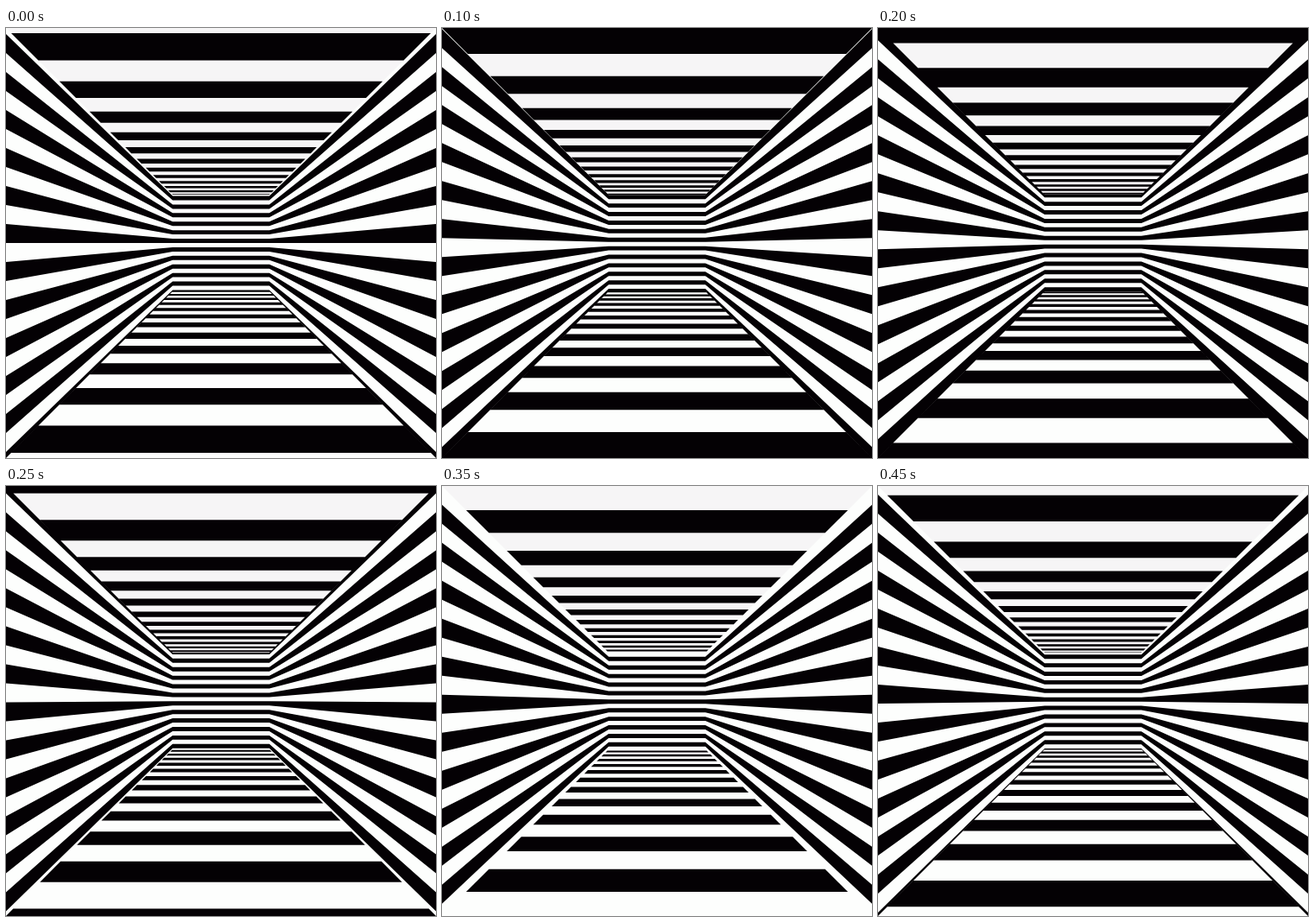
Animation of 498 by 498 pixels, one loop 0.5 s. Source, as an HTML page with a canvas:

```html
<!DOCTYPE html>
<html lang="en">
<head>
<meta charset="utf-8">
<title>Striped room</title>
<style>
  html, body { margin: 0; width: 100%; height: 100%; overflow: hidden; background: #fdfefd; }
  canvas { display: block; width: 498px; height: 498px; }
</style>
</head>
<body>
<canvas id="room" width="498" height="498"></canvas>
<script>
const ctx = document.getElementById('room').getContext('2d');
const SIZE = 498, MID = SIZE / 2;
const BACK = 56;                 // half size of the far wall
const FAR = MID / BACK;          // depth of the far wall, the front being 1
const DEPTH = 0.3052;            // stripe period along floor and ceiling
const START = 1.0247;            // depth of the first dark slab
const HEIGHT = 44;               // stripe period on the walls, at the front
const INK = '#040104', PAPER = '#fdfefd', CEILING = '#f6f5f6';

// Uneven steps through a cycle of 15, one every 50 ms
const STEPS = [0, 1, 2, 3, 5, 7, 9, 10, 12, 14];
const HOLD = 50;

const clamp = (v, lo, hi) => Math.min(hi, Math.max(lo, v));

function polygon(points) {
  points.forEach(([x, y], i) => ctx[i ? 'lineTo' : 'moveTo'](MID + x, MID + y));
  ctx.closePath();
}

// Slab of floor (side 1) or ceiling (side -1) between two depths
function slab(side, near, far) {
  const a = MID / near, b = MID / far;
  polygon([[-a, side * a], [a, side * a], [b, side * b], [-b, side * b]]);
}

// Stripe running along the left, far and right walls
function band(top, bottom) {
  const s = 1 / FAR;
  polygon([
    [-MID, top], [-BACK, top * s], [BACK, top * s], [MID, top],
    [MID, bottom], [BACK, bottom * s], [-BACK, bottom * s], [-MID, bottom]
  ]);
}

function draw(phase) {
  ctx.fillStyle = PAPER;
  ctx.fillRect(0, 0, SIZE, SIZE);

  ctx.fillStyle = CEILING;
  ctx.beginPath();
  slab(-1, 1, FAR);
  ctx.fill();

  // All dark stripes share one path, so no seams show where they meet
  ctx.fillStyle = INK;
  ctx.beginPath();
  for (let z = START - phase * DEPTH; z < FAR; z += DEPTH) {
    const near = clamp(z, 1, FAR), far = clamp(z + DEPTH / 2, 1, FAR);
    if (far > near) {
      slab(-1, near, far);
      slab(1, near, far);
    }
  }
  for (let k = -6; k <= 7; k++) {
    const bottom = (k - phase) * HEIGHT;
    const y1 = clamp(bottom - HEIGHT / 2, -MID, MID), y2 = clamp(bottom, -MID, MID);
    if (y2 > y1) band(y1, y2);
  }
  ctx.fill();
}

function tick() {
  const i = Math.floor(performance.now() / HOLD) % STEPS.length;
  draw(STEPS[i] / 15);
  requestAnimationFrame(tick);
}
tick();
</script>
</body>
</html>
```
